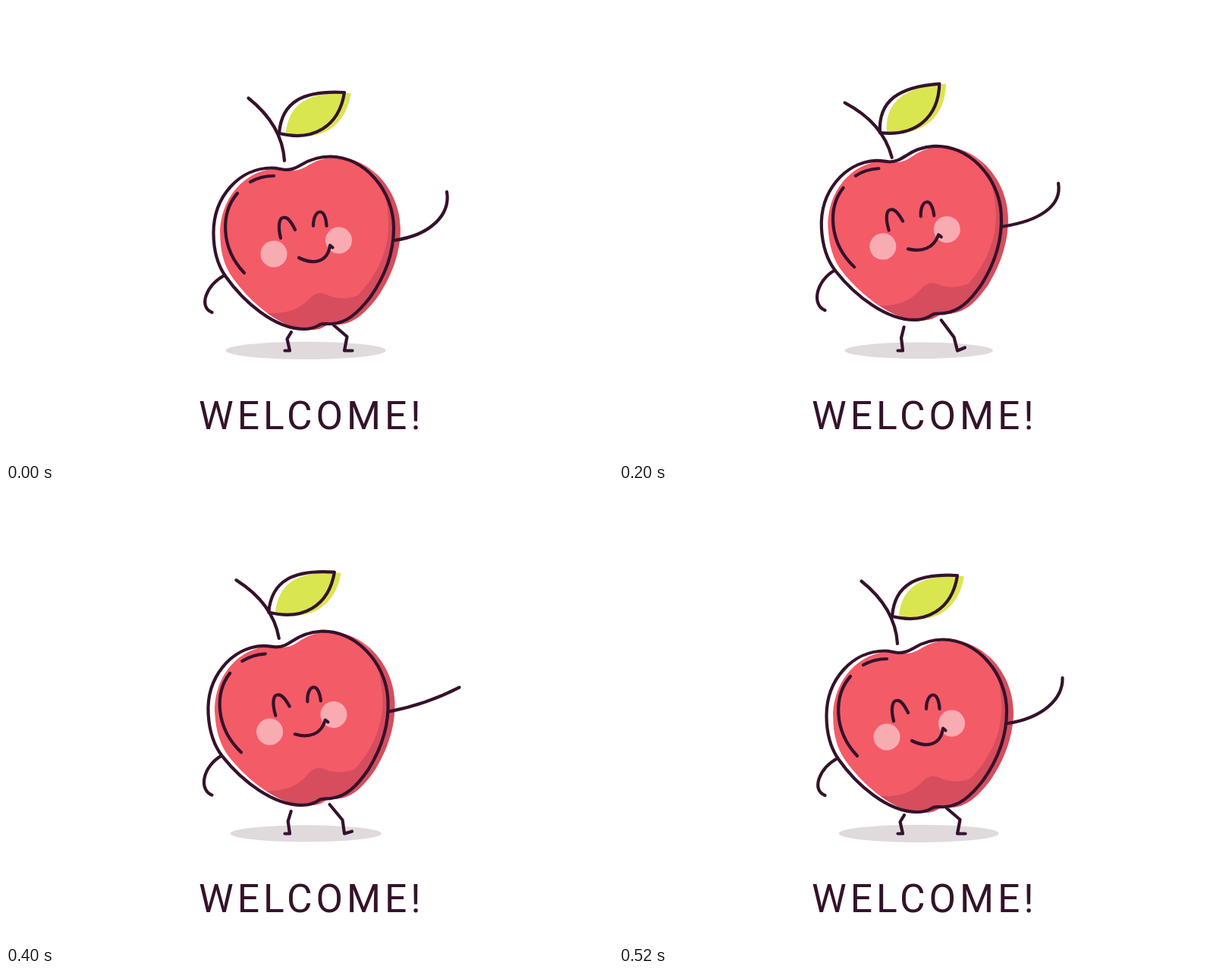
An HTML page with a canvas that plays this animation: 800 by 600 pixels, repeating every 560 ms.

```html
<!DOCTYPE html>
<html lang="en">
<head>
<meta charset="utf-8">
<title>Welcome</title>
<style>
html, body { margin: 0; width: 800px; height: 600px; overflow: hidden; background: #fff; }
canvas { display: block; }
</style>
</head>
<body>
<canvas id="stage" width="800" height="600"></canvas>
<script>
const ctx = document.getElementById('stage').getContext('2d');
const INK = '#35122b', RED = '#f35b67', SHADE = '#d64d5d', BLUSH = '#f9abb2', LIME = '#d9e650', GREY = '#e0dadd';
const CENTER = [395.75, 318];

const apple = new Path2D(`M368 216 C361 215.5 358 213.5 350 213.5 C308 213.5 273.5 251 273.5 299
  C273.5 321 278 340 289 356 C313 390 354 426 393 426 C406 426 410 422 414 420 C419 418 424 420 430 419
  C448 418 463 406 480 384 C499 357 511 325 511 293 C511 243 472 198.5 427 198.5
  C410 198.5 398 204 389 209.5 C382 213.5 377 216 368 216Z`);
const shade = new Path2D(`M345 405 C375 406 388 398 400 386 C408 377 417 377 426 382 C438 387 452 386 463 382
  C487 358 504 325 504 290 C504 262 499 238 487 220 L530 220 V432 H345Z`);
const face = new Path2D(`M305 247 C283 272 282 318 314 352 M322 232 Q336 224 353 224
  M362 306 C358 290 360 279 366 279 C372 278 377 287 381 295
  M405 290 C405 279 409 271.5 414 271.5 C419 271.5 422 280 422.5 290`);
const stem = new Path2D('M-47.5 -82.5 Q-3 -47 0 0');
const leaf = new Path2D('M0 0 C3 -42 32 -57 86 -54 C79 -9 45 11 0 0Z');

// Loop progress 0..1; sway() is a sum of sine harmonics, at rest at both ends
let q = 0;
const sway = (...amps) => amps.reduce((sum, a, i) => sum + a * Math.sin((i + 1) * Math.PI * q), 0);

function placed([x, y, deg], draw) {
  ctx.save();
  ctx.translate(x, y);
  ctx.rotate(deg * Math.PI / 180);
  draw();
  ctx.restore();
}

// Stage position of a point that is fixed to the body
function attached([x, y, deg], px, py) {
  const a = deg * Math.PI / 180, dx = px - CENTER[0], dy = py - CENTER[1];
  return [x + dx * Math.cos(a) - dy * Math.sin(a), y + dx * Math.sin(a) + dy * Math.cos(a)];
}

function oval(x, y, rx, ry, color) {
  ctx.fillStyle = color;
  ctx.beginPath();
  ctx.ellipse(x, y, rx, ry, 0, 0, 7);
  ctx.fill();
}

// Curve from shoulder to hand, with handles relative to each end
function arm([sx, sy], [hx, hy], [ax, ay], [bx, by]) {
  ctx.beginPath();
  ctx.moveTo(sx, sy);
  ctx.bezierCurveTo(sx + ax, sy + ay, hx + bx, hy + by, hx, hy);
  ctx.stroke();
}

function leg(...points) {
  ctx.beginPath();
  points.forEach(p => ctx.lineTo(...p));
  ctx.stroke();
}

function offsetFill(path, color) {
  ctx.translate(8.7, 1);
  ctx.fillStyle = color;
  ctx.fill(path);
}

function drawLeaf() {
  ctx.save();
  offsetFill(leaf, LIME);
  ctx.restore();
  ctx.stroke(leaf);
}

function drawBody(crouch) {
  ctx.translate(-CENTER[0], -CENTER[1]);
  ctx.save();
  offsetFill(apple, RED);
  ctx.clip(apple);
  ctx.translate(-8.7, -1);
  ctx.fillStyle = SHADE;
  ctx.fill(shade);
  ctx.restore();
  oval(353, 327, 17.5, 17.5, BLUSH);
  oval(438.5, 309, 17.5, 17.5, BLUSH);
  ctx.stroke(apple);
  ctx.stroke(face);
  // The smile flattens as the body rises
  ctx.beginPath();
  ctx.moveTo(386, 332);
  ctx.bezierCurveTo(404, 335.7 + 5.3 * crouch, 417.7 + 6.3 * crouch, 330 + 9 * crouch, 427, 315.5);
  ctx.lineTo(430.5, 318.5);
  ctx.stroke();
}

function draw(now) {
  q = Math.max(0, Math.floor(now % 560 / 40) - 1) / 12;
  const u = Math.abs(2 * q - 1);
  ctx.clearRect(0, 0, 800, 600);
  ctx.strokeStyle = INK;
  ctx.lineWidth = 4.2;
  ctx.lineCap = ctx.lineJoin = 'round';

  oval(395.2, 454.3, 93.5 + 12 * u, 10.4 + 1.2 * u, GREY);
  leg([375.4 + .6 * u, 420 + 10 * u], [372.8 - 2.3 * u, 437 + 2 * u], [374, 454.5], [367.5, 454.5]);
  leg([421 + 11 * u, 411 + 10 * u], [437.5 + 12 * u, 437 - u], [446, 454.5], [455.5 + u, 448.5 + 6 * u]);

  const body = [CENTER[0] + sway(-7.95, 1.3, 1.25), CENTER[1] + sway(-13.4, -.6, -.5), sway(-4.2, .7, .7)];
  placed(body, () => drawBody(u));
  placed([360 + sway(-20, 1.4, 2.5), 168 + sway(-2.8, 1.7, -2.5), sway(-4.9, -3.55, .9)], drawLeaf);
  placed([367 + sway(-9.6, 1.15, 1), 204 + sway(-6.3, 1.45, -1.8), sway(-11.7, -.7, 1.7)], () => ctx.stroke(stem));

  arm(attached(body, 288, 355), [271.5, 404 + sway(-1.1, -2, -2.3)], [-25, 14], [-18, -7]);
  const reach = 3.5 * q + sway(6.7, -8.8, .4, 1.5);
  const stretch = Math.max(0, reach / 18) ** 1.3;
  arm(attached(body, 512, 309), [581 + reach, 245 + 4 * q + sway(.1, -13.3, .3, 1.2)],
    [48 - 14 * stretch, -7], [5 - 36 * stretch, 30 - 18 * stretch]);

  ctx.fillStyle = INK;
  ctx.font = '51.5px Roboto, sans-serif';
  ctx.letterSpacing = '5px';
  ctx.fillText('WELCOME!', 254, 557.5);
  requestAnimationFrame(draw);
}
requestAnimationFrame(draw);
</script>
</body>
</html>
```
